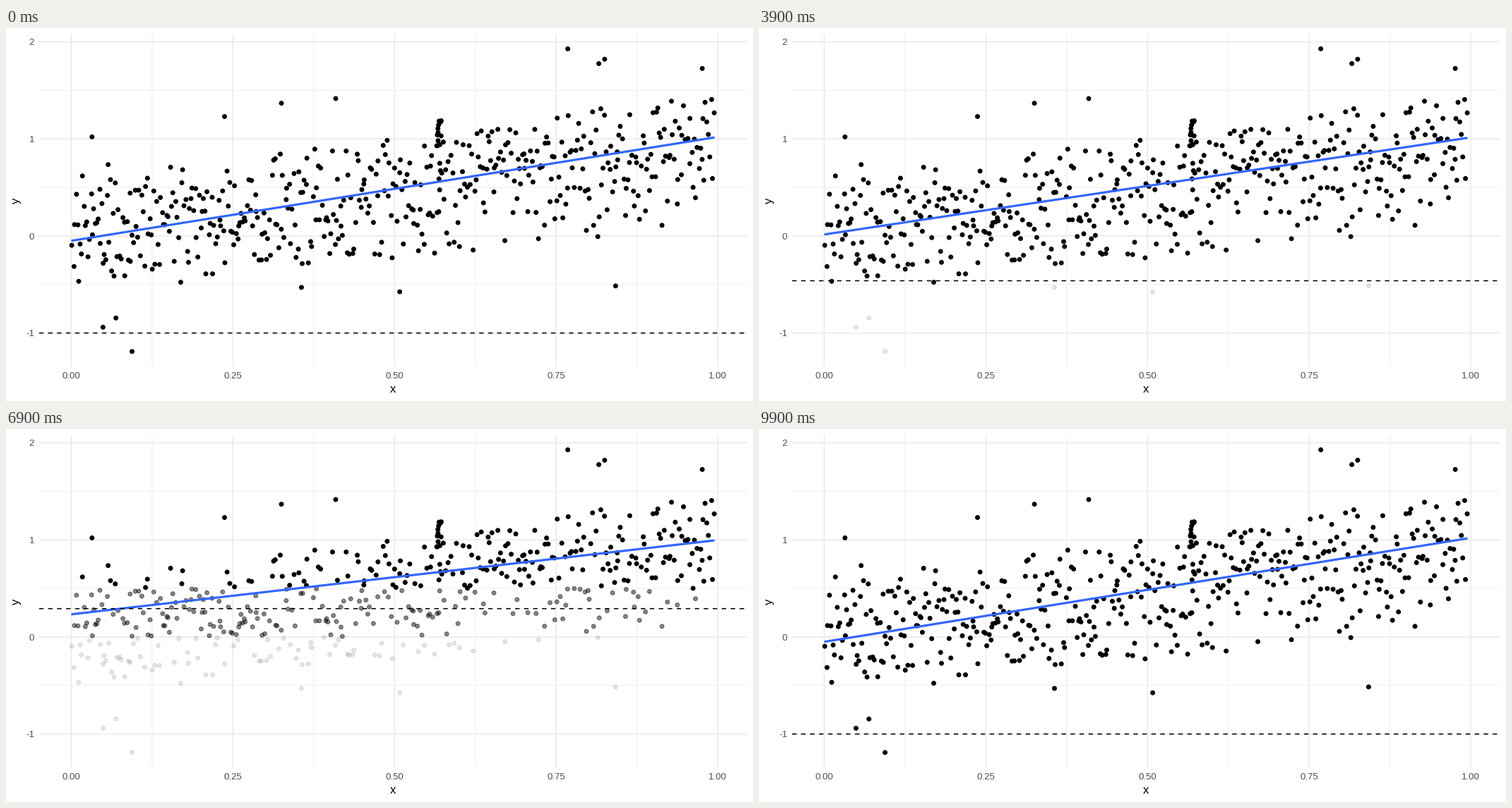
A matplotlib script that plays this animation: 1058x529 px, repeating every 10000 ms.

```python
import numpy as np
import matplotlib.pyplot as plt
from matplotlib.animation import FuncAnimation

W, H, DPI = 1058, 529, 100
FRAMES, INTERVAL = 100, 100
PT = 72 / DPI                       # points per pixel
LEFT, RIGHT, TOP, BOTTOM = 46.9, 1049.7, 8.3, 480.5
X0, SX, Y0, SY = 92.5, 915.6, 294.9, 137.7
FONT = "Liberation Sans"
X_MAX = 0.995

CUTS = [-1, -0.5, 0, 0.5]           # dashed line height per state
LIMITS = [-9, -0.5, 0, 0.5]         # points below fade out
MOVES = [(12, 25), (38, 51), (62, 74), (87, 99)]   # start and end frames
# first x, intercept and slope of the trend per state
FITS = [(0, -0.05, 1.07), (0, 0.015, 1.0),
        (0, 0.233, 0.765), (0.0325, 0.617, 0.44)]

EXTREMES = [(0.768, 1.927), (0.825, 1.82), (0.816, 1.775), (0.976, 1.725),
            (0.032, 1.02), (0.057, 0.735), (0.325, 1.367), (0.409, 1.415),
            (0.237, 1.23), (0.094, -1.19), (0.049, -0.94), (0.069, -0.845),
            (0.356, -0.53), (0.508, -0.575), (0.842, -0.515)]


def px(x):
    return X0 + SX * np.asarray(x)


def py(y):
    return Y0 - SY * np.asarray(y)


def make_points(n=470, column=14):
    """Noisy rising band, a narrow column and a few extremes."""
    rng = np.random.default_rng(8)
    x = X_MAX * (np.arange(n) + rng.uniform(0, 1, n)) / n
    trend = -0.05 + 1.07 * x
    low, high = -0.6 + 0.7 * x, 0.62 + 0.85 * x
    y = trend + rng.normal(0, 0.42, n)
    out = (y < low) | (y > high)
    y[out] = rng.uniform(low, high)[out]
    cx = rng.uniform(0.566, 0.573, column)
    cy = rng.uniform(0.5, 1.2, column)
    ex, ey = np.transpose(EXTREMES)
    return np.concatenate([x, cx, ex]), np.concatenate([y, cy, ey])


def alphas(state):
    return np.where(ys < LIMITS[state], 0.1, 1.0)


def fit(state):
    start, c, m = FITS[state]
    x = np.array([start, X_MAX])
    return px(x), py(c + m * x)


def label(x, y, s, size, color, **kw):
    ax.text(x, y, s, fontsize=size * PT, color=color, family=FONT,
            va="baseline", rotation_mode="anchor", **kw)


def grid(xs, ys, width):
    style = dict(color="#ebebeb", lw=width * PT, snap=False,
                 solid_capstyle="butt", zorder=1)
    for x in px(xs):
        ax.plot([x, x], [TOP, BOTTOM], **style)
    for y in py(ys):
        ax.plot([LEFT, RIGHT], [y, y], **style)


fig = plt.figure(figsize=(W / DPI, H / DPI), dpi=DPI, facecolor="white")
ax = fig.add_axes([0, 0, 1, 1])
ax.set(xlim=(0, W), ylim=(H, 0))
ax.axis("off")

grid(np.arange(0.125, 1, 0.25), [-0.5, 0.5, 1.5], 0.8)
grid(np.arange(0, 1.01, 0.25), [-1, 0, 1, 2], 1.6)

for v in np.arange(0, 1.01, 0.25):
    label(px(v), 497.2, f"{v:.2f}", 13.27, "#4d4d4d", ha="center")
for v in range(-1, 3):
    label(40, py(v) + 4.8, str(v), 13.27, "#4d4d4d", ha="right")
label(548.3, 517, "x", 16.6, "black", ha="center")
label(18.8, 244.4, "y", 16.6, "black", ha="center", rotation=90)

xs, ys = make_points()
dots = ax.scatter(px(xs), py(ys), s=(5.86 * PT) ** 2, lw=1.06 * PT, zorder=2)
cut, = ax.plot([], [], color="black", lw=1.59 * PT, ls=(0, (4, 4)),
               dash_capstyle="butt", snap=False, zorder=4)
trend, = ax.plot([], [], color="#3366ff", lw=3.2 * PT,
                 solid_capstyle="butt", zorder=3)


def pose(frame):
    """Return the current state, the next one and the progress between."""
    for k, (start, end) in enumerate(MOVES):
        if frame <= end:
            return k, (k + 1) % 4, max(0, (frame - start) / (end - start))


def update(frame):
    a, b, t = pose(frame)
    y = py(CUTS[a] + (CUTS[b] - CUTS[a]) * t)
    cut.set_data([LEFT, RIGHT], [y, y])
    rgba = np.zeros((len(xs), 4))
    rgba[:, 3] = (1 - t) * alphas(a) + t * alphas(b)
    dots.set_facecolor(rgba)
    dots.set_edgecolor(rgba)
    trend.set_data(*fit(b if t > 0.92 else a))
    return dots, cut, trend


anim = FuncAnimation(fig, update, frames=FRAMES, interval=INTERVAL,
                     repeat=True, repeat_delay=0, blit=False)
plt.show()
```
